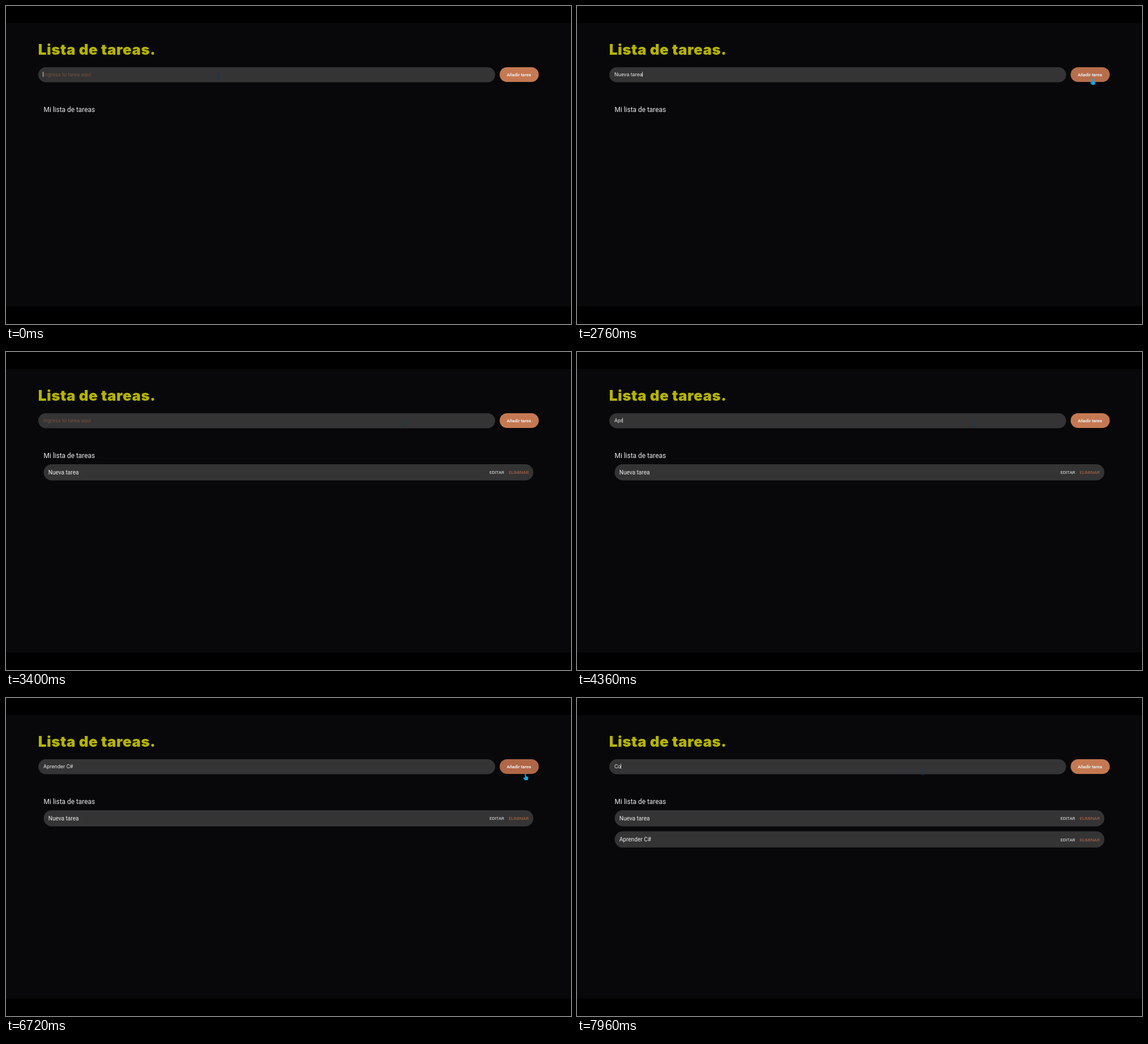
An HTML page for the animation above (8000 ms loop, 998 by 561 pixels).

```html
<!DOCTYPE html>
<html lang="es">
<head>
<meta charset="utf-8">
<title>Lista de tareas</title>
<style>
  html, body { margin: 0; width: 100%; height: 100%; overflow: hidden; background: #000; }
  svg { display: block; width: 100%; height: 100%; }
  text { font-family: Roboto, sans-serif; fill: #ececec; white-space: pre; }
  .title { font: 900 26px Inter, sans-serif; letter-spacing: .5px; fill: #b5b300; }
  .field { font: 8.7px Inter, sans-serif; }
  .hint { fill: #76513f; }
  .head { font-size: 11.9px; }
  .name { font-size: 10.1px; }
  .act { font-size: 7.8px; }
  .del { fill: #bd6a43; }
  .add { font-size: 7.8px; font-weight: 700; }
  .box { fill: #343434; }
</style>
</head>
<body>
<svg viewBox="0 0 998 561">
  <rect width="998" height="561" fill="#000"/>
  <rect y="30" width="998" height="500" fill="#08080a"/>
  <text class="title" x="56.8" y="86">Lista de tareas.</text>

  <rect class="box" x="57" y="108" width="807" height="26.5" rx="13.25"/>
  <text class="field hint" id="hint" x="66" y="123.7">Ingresa tu tarea aquí</text>
  <text class="field" id="entry" x="66" y="123.7"></text>
  <rect id="caret" y="116" width="1" height="9" fill="#c8c8c8"/>

  <rect id="button" x="872" y="108" width="69" height="26" rx="13"/>
  <text class="add" x="906" y="123.8" text-anchor="middle">Añadir tarea</text>

  <text class="head" x="66.5" y="187.4">Mi lista de tareas</text>
  <g id="list"></g>

  <path id="beam" d="M-2.5-5Q0-5 0-3.5Q0-5 2.5-5M0-3.5V3.5M-2.5 5Q0 5 0 3.5Q0 5 2.5 5"
        fill="none" stroke="#0b3f4b"/>
  <path id="hand" d="M-1 1Q0-.8 1 1V4.5L4.2 5.5Q5.3 6 5 7.5L4 11.5H-.8L-3.8 8Q-3.6 6.2-1 7.2Z"
        fill="#1ba6dc"/>
  <path id="arrow" d="M0 0V10L2.4 7.8L4 11L5.4 10.3L4 7.2H7Z" fill="#1ba6dc"/>
</svg>
<script>
const LOOP = 8000;
const BLINK = 500;
const $ = id => document.getElementById(id);
const show = (el, on) => el.setAttribute('visibility', on ? 'visible' : 'hidden');

// Field states: time, text, focused
const states = [{ t: -180, text: '', focus: true }];
const set = (t, text, focus = true) => states.push({ t, text, focus });
const type = (start, step, base, text) =>
  [...text].forEach((_, i) => set(start + i * step, base + text.slice(0, i + 1)));

type(520, 96, '', 'Nueva ');
type(1720, 145, 'Nueva ', 'tarea');
set(2840, '', false);
set(3720, '');
type(4160, 90, '', 'Aprender ');
type(5640, 160, 'Aprender ', 'C#');
set(6860, '', false);
set(7480, '');
type(7800, 120, '', 'Co');

// Pointer stops: time, x, y
const stops = [
  [0, 375, 124], [2300, 375, 124], [2600, 908, 126], [2760, 910, 127],
  [2940, 910, 127], [3380, 704, 126], [3680, 701, 127], [6240, 701, 127],
  [6500, 917, 133], [6960, 917, 133], [7440, 610, 130], [LOOP, 610, 130]
];

// Times at which the pointer enters and leaves the button
const hovers = [[2580, 2980], [6440, 7020]];
const FADE = 300;

const items = [
  { t: 2840, name: 'Nueva tarea', y: 198 },
  { t: 6860, name: 'Aprender C#', y: 235.3 }
];

for (const item of items) {
  item.el = document.createElementNS('http://www.w3.org/2000/svg', 'g');
  item.el.setAttribute('transform', `translate(0 ${item.y})`);
  item.el.innerHTML = `
    <rect class="box" x="66.5" width="865" height="28.5" rx="14.25"/>
    <text class="name" x="74.7" y="17.6">${item.name}</text>
    <text class="act" x="854" y="17.3">EDITAR</text>
    <text class="act del" x="888" y="17.3">ELIMINAR</text>`;
  $('list').append(item.el);
}

const clamp = v => Math.max(0, Math.min(1, v));
const mix = (a, b, k) => a + (b - a) * k;

function pointerAt(t) {
  const i = Math.max(1, stops.findIndex(s => s[0] > t));
  const [a, b] = [stops[i - 1], stops[i]];
  const k = clamp((t - a[0]) / (b[0] - a[0]));
  const e = k * k * (3 - 2 * k);
  return [mix(a[1], b[1], e), mix(a[2], b[2], e)];
}

function drawField(t) {
  const now = states.findLast(s => s.t <= t);
  $('entry').textContent = now.text;
  show($('hint'), !now.text);
  const width = now.text ? $('entry').getComputedTextLength() : 0;
  $('caret').setAttribute('x', Math.floor(65.5 + width));
  show($('caret'), now.focus && (t - now.t) % (2 * BLINK) < BLINK);
}

function drawPointer(t) {
  const [x, y] = pointerAt(t).map(v => Math.floor(v) + 0.5);
  const kind = x < 864 ? 'beam' : x > 872 ? 'hand' : 'arrow';
  for (const id of ['beam', 'hand', 'arrow']) {
    show($(id), id === kind);
    $(id).setAttribute('transform', `translate(${x} ${y})`);
  }
}

function drawButton(t) {
  const k = Math.max(...hovers.map(([a, b]) => clamp((t - a) / FADE) * clamp(1 - (t - b) / FADE)));
  const rgb = [[197, 121, 82], [174, 102, 70]];
  $('button').setAttribute('fill', `rgb(${rgb[0].map((c, i) => Math.round(mix(c, rgb[1][i], k)))})`);
}

function draw(t) {
  drawField(t);
  drawPointer(t);
  drawButton(t);
  for (const item of items) show(item.el, t >= item.t);
}

const start = performance.now();
function tick() {
  draw((performance.now() - start) % LOOP);
  requestAnimationFrame(tick);
}
tick();
</script>
</body>
</html>
```
